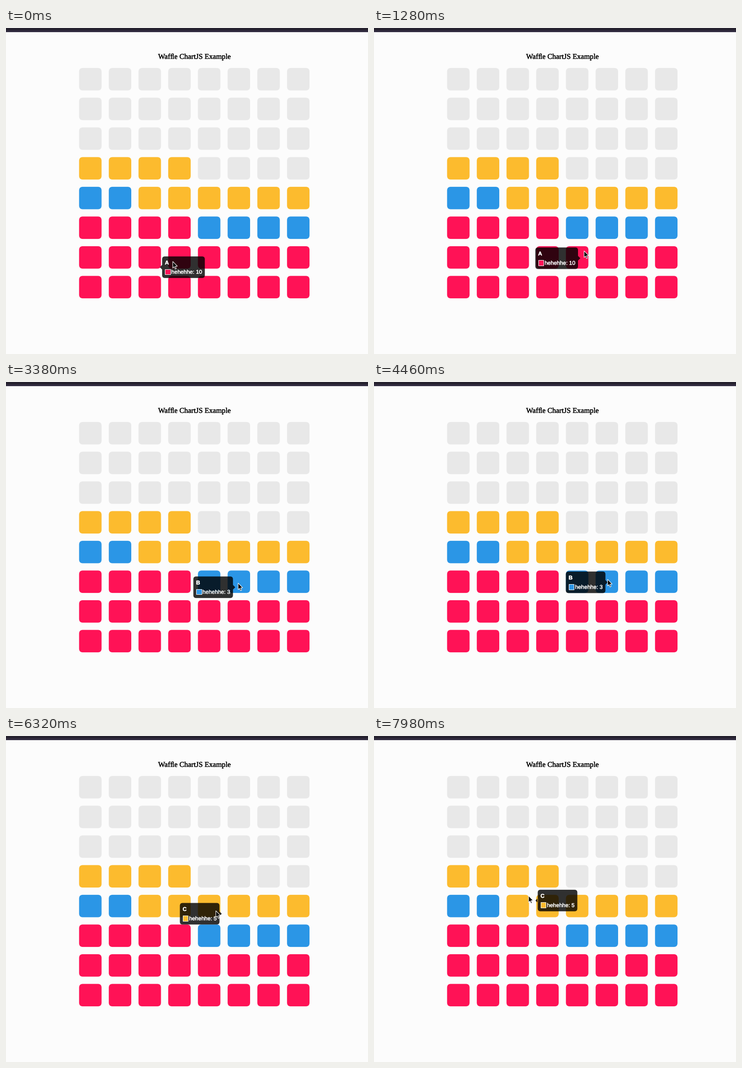
Write a matplotlib script that moves like this. It is 786 by 708 pixels and loops after 8 s.

```python
import numpy as np
import matplotlib.pyplot as plt
from matplotlib.animation import FuncAnimation
from matplotlib.collections import PatchCollection
from matplotlib.patches import BoxStyle, FancyBboxPatch, PathPatch, Polygon, Rectangle
from matplotlib.path import Path
from matplotlib.patheffects import withStroke

W, H, DPI = 786, 708, 64
STEP, LOOP = 20, 8000
PX = 72 / DPI  # points per pixel

PAPER = "#fcfcfc"
COLORS = {"A": "#ff1256", "B": "#2b96e6", "C": "#fcbb2e", "": "#e8e8e8"}
VALUE = {"A": 10, "B": 3, "C": 5}

# time, pointer x, y, caret x, y
TRACK = np.array([
    (0, 361.5, 506, 334, 519.5),
    (1280, 455.5, 483, 448, 500),
    (2400, 500.5, 443, 489, 455.5),
    (4460, 506.5, 427.5, 507.5, 435),
    (5620, 478, 386, 489, 402),
    (6320, 455, 378.5, 468.5, 386),
    (7980, 335, 346, 350.5, 357.3),
])
TO_RIGHT, TO_LEFT = 840, 7155
TO_B, TO_C = 1840, 5200

fig = plt.figure(figsize=(W / DPI, H / DPI), dpi=DPI, facecolor=PAPER)
ax = fig.add_axes([0, 0, 1, 1])
ax.set_xlim(0, W)
ax.set_ylim(H, 0)
ax.axis("off")


def label(x, y, text, size, family="Liberation Sans", color="white", **kw):
    heavier = [withStroke(linewidth=0.35 * PX, foreground=color)]
    return ax.text(x, y, text, fontsize=size * PX, family=family, color=color,
                   va="baseline", path_effects=heavier, **kw)


def kind(index):
    """Category of a cell, counted from the bottom left."""
    for name, end in (("A", 20), ("B", 26), ("C", 36)):
        if index < end:
            return name
    return ""


cells, fills = [], []
for i in range(64):
    row, col = divmod(i, 8)
    cells.append(FancyBboxPatch((158.7 + 64.5 * col, 538.4 - 64.5 * row), 48.8, 48.7,
                                boxstyle="round,pad=0,rounding_size=8"))
    fills.append(COLORS[kind(i)])
ax.add_collection(PatchCollection(cells, facecolors=fills, linewidths=0, zorder=2),
                  autolim=False)

ax.add_patch(Rectangle((0, 0), W, 9, color="#322c40", lw=0))
ax.add_patch(Rectangle((0, 0), W, 5, color="#25212e", lw=0))
label(409, 67, "Waf\ufb02e ChartJS Example", 16, "Liberation Serif", "black", ha="center")

tip = ax.add_patch(PathPatch(Path([(0, 0), (1, 1)]), fc="black", alpha=0.81, lw=0, zorder=3))
swatch = ax.add_patch(Rectangle((0, 0), 11.6, 11.6, ec="white", lw=PX, zorder=5))
head = label(0, 0, "", 12, weight="bold", zorder=5)
body = label(0, 0, "", 12, zorder=5)

ARROW = np.array([(0, 0), (0, 14.4), (3.2, 11.4), (5.4, 16.6), (7.7, 15.6),
                  (5.5, 10.6), (10, 10.4)]) + (0.6, 1)
pointer = ax.add_patch(Polygon(ARROW, fc="black", ec="white", lw=1.1 * PX,
                               joinstyle="miter", zorder=6))
round_box = BoxStyle.Round(pad=0, rounding_size=6)


def ease_out(t):
    return 1 - (1 - np.clip(t / 400, 0, 1)) ** 4


def place_tip(t, cx, cy):
    name = "A" if t < TO_B else "B" if t < TO_C else "C"
    width = 92.7 if name == "A" else 86
    shift = ease_out(t - TO_RIGHT) - ease_out(t - TO_LEFT)
    left = cx + 5 - shift * (width + 10)
    top = cy - 23.4

    on_right = TO_RIGHT <= t < TO_LEFT
    edge, out = (left + width, 5) if on_right else (left, -5)
    caret = Path([(edge, cy - 5), (edge + out, cy), (edge, cy + 5), (edge, cy - 5)],
                 closed=True)
    tip.set_path(Path.make_compound_path(round_box(left, top, width, 46.8, 1), caret))

    swatch.set_xy((left + 6.2, top + 27.4))
    swatch.set_facecolor(COLORS[name])
    head.set_text(name)
    head.set_position((left + 6, top + 17.4))
    body.set_text(f"hehehhe: {VALUE[name]}")
    body.set_position((left + 20, top + 37.6))


def draw(frame):
    t = frame * STEP
    px, py, cx, cy = (np.interp(t, TRACK[:, 0], c) for c in TRACK.T[1:])
    place_tip(t, cx, cy)
    pointer.set_xy(ARROW + (px, py))
    return tip, swatch, head, body, pointer


anim = FuncAnimation(fig, draw, frames=LOOP // STEP, interval=STEP,
                     repeat=True, repeat_delay=0, blit=False)
plt.show()
```
